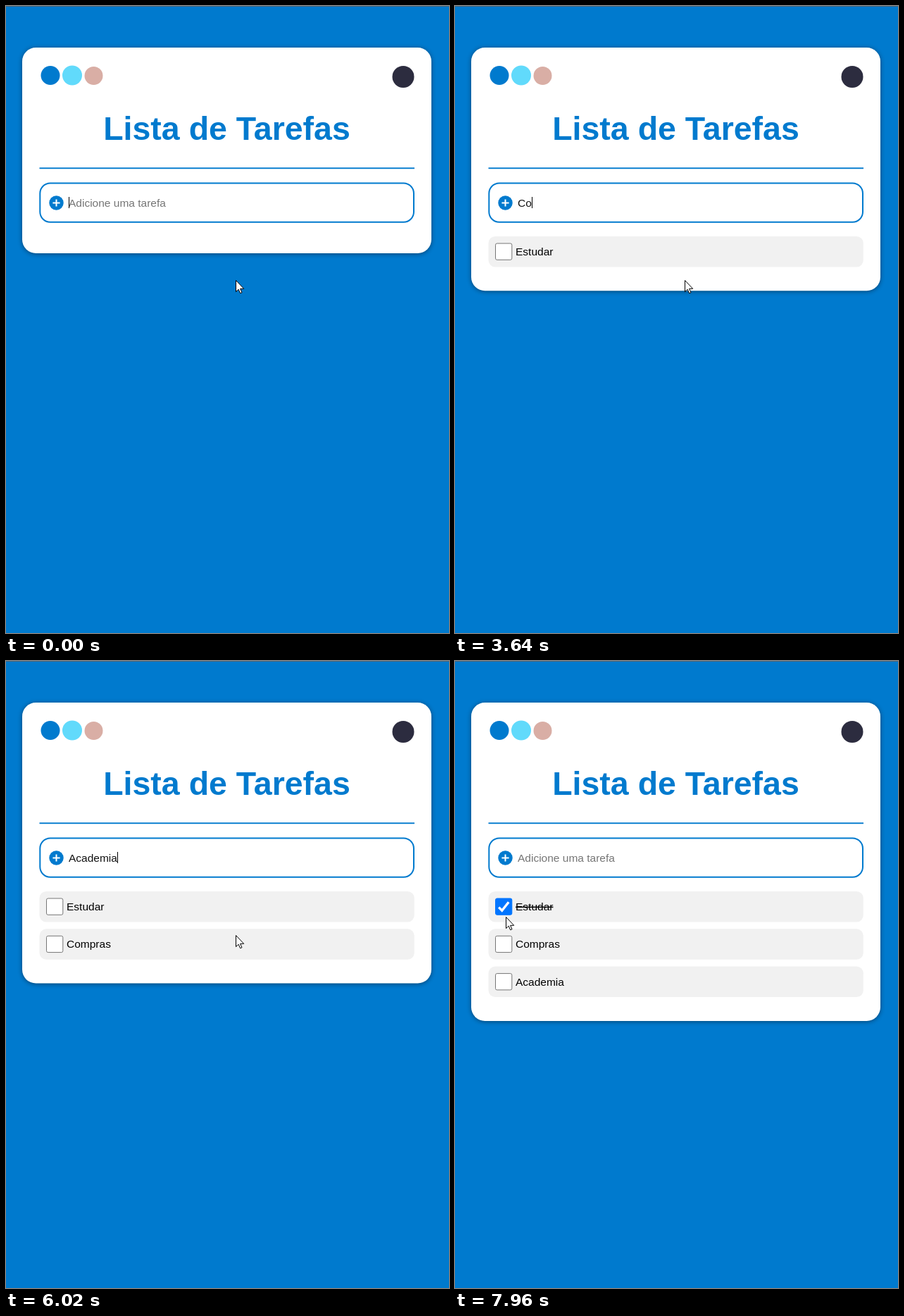
These frames come from a looping animation (629x890 px, 7990 ms). An HTML page:

```html
<!DOCTYPE html>
<html lang="pt">
<head>
<meta charset="utf-8">
<title>Lista de Tarefas</title>
<style>
  html, body { margin: 0; width: 100%; height: 100%; overflow: hidden; background: #007ace; }
  svg { display: block; width: 100%; height: 100%; }
  text { font: 15.5px "Liberation Sans", Arial, sans-serif; white-space: pre; }
  .title { font-size: 46.5px; font-weight: bold; fill: #007ace; }
  #card { filter: drop-shadow(0 1px 3px rgba(0, 0, 0, .45)); }
</style>
</head>
<body>
<svg viewBox="0 0 629 890">
  <rect width="629" height="890" fill="#007ace"/>
  <rect width="629" height="1" fill="#4d6677"/>
  <rect id="card" x="23" y="59" width="581" height="292" rx="19.5" fill="#fff"/>
  <circle cx="63" cy="98.5" r="13.5" fill="#007ace"/>
  <circle cx="94" cy="98.5" r="14" fill="#61dafb"/>
  <circle cx="124.5" cy="99" r="13" fill="#d9aea5"/>
  <circle cx="564" cy="100.5" r="15.5" fill="#2c2c3f"/>
  <text class="title" x="313.5" y="190" text-anchor="middle">Lista de Tarefas</text>
  <rect x="47.5" y="229.3" width="532.5" height="1.9" fill="#007ace"/>
  <rect x="48.3" y="251.5" width="530.7" height="55.3" rx="14.5" fill="#fff" stroke="#007ace" stroke-width="2"/>
  <circle cx="71.5" cy="279.5" r="10.2" fill="#007ace"/>
  <path d="M66.4 279.5h10.2M71.5 274.4v10.2" stroke="#fff" stroke-width="2"/>
  <text id="field" x="89" y="284.5"></text>
  <rect id="caret" x="89" y="271" width="1" height="16"/>
  <g id="items"></g>
  <path id="pointer" d="M.5 .5V16.6L4.2 13.2 6.6 18.7 9 17.7 6.6 12.3H11.7Z" fill="#fff" stroke="#000"/>
</svg>
<script>
const LOOP = 7990, ROW = 53.3, CHECKED = 7680;
const $ = id => document.getElementById(id);

// Each task: key press times, then the moment it joins the list.
const tasks = [
  { name: 'Estudar', keys: [1010, 1200, 1380, 1510, 1640, 1870, 2070], added: 2370 },
  { name: 'Compras', keys: [3400, 3640, 3890, 4000, 4120, 4280, 4400], added: 4650 },
  { name: 'Academia', keys: [4880, 5090, 5290, 5490, 5620, 5750, 5890, 6020], added: 6240 }
];
const caretOff = [[300, 810], [2590, 3120], [6540, 7070], [7600, LOOP]];

// Pointer tip: time, x, y
const moves = [
  [6840, 326, 389], [6930, 262, 374], [7080, 129, 349],
  [7230, 92, 346], [7440, 70, 347], [7740, 69, 349], [7960, 72, 363]
];

$('items').innerHTML = tasks.map((task, i) => `
  <g transform="translate(0 ${i * ROW})">
    <rect x="47.5" y="327" width="532.3" height="43.5" rx="9.7" fill="#f1f1f1"/>
    <rect class="box" x="57.5" y="337" width="23.3" height="23.3" rx="2.2"/>
    <path class="tick" d="M62.2 349.6L66.7 354.2 76.2 342.2" fill="none" stroke="#fff" stroke-width="3.4"/>
    <text x="86" y="354">${task.name}</text>
  </g>`).join('');
const rows = [...$('items').children];

function pointerAt(t) {
  const next = moves.findIndex(m => m[0] > t);
  if (next === 0) return moves[0].slice(1);
  if (next < 0) return moves[moves.length - 1].slice(1);
  const a = moves[next - 1], b = moves[next];
  const step = Math.floor((t - a[0]) / 30) * 30 / (b[0] - a[0]);
  return [1, 2].map(k => Math.round(a[k] + (b[k] - a[k]) * step));
}

function draw(t) {
  const count = tasks.filter(task => t >= task.added).length;
  const task = tasks[count];
  const typed = task ? task.name.slice(0, task.keys.filter(k => t >= k).length) : '';

  $('field').textContent = typed || 'Adicione uma tarefa';
  $('field').setAttribute('fill', typed ? '#111' : '#757575');
  $('caret').setAttribute('x', 89 + (typed ? Math.round($('field').getComputedTextLength()) : 0));
  $('caret').setAttribute('visibility', caretOff.some(([a, b]) => t >= a && t < b) ? 'hidden' : 'visible');
  $('card').setAttribute('height', 292 + count * ROW);

  rows.forEach((row, i) => {
    const done = i === 0 && t >= CHECKED;
    const box = row.querySelector('.box');
    row.style.display = i < count ? '' : 'none';
    box.setAttribute('fill', done ? '#0075ff' : '#fff');
    box.setAttribute('stroke', done ? '#0075ff' : '#767676');
    row.querySelector('.tick').style.display = done ? '' : 'none';
    row.querySelector('text').style.textDecoration = done ? 'line-through' : 'none';
  });

  $('pointer').setAttribute('transform', `translate(${pointerAt(t)})`);
}

const start = performance.now();
function tick() {
  draw((performance.now() - start) % LOOP);
  requestAnimationFrame(tick);
}
tick();
</script>
</body>
</html>
```
